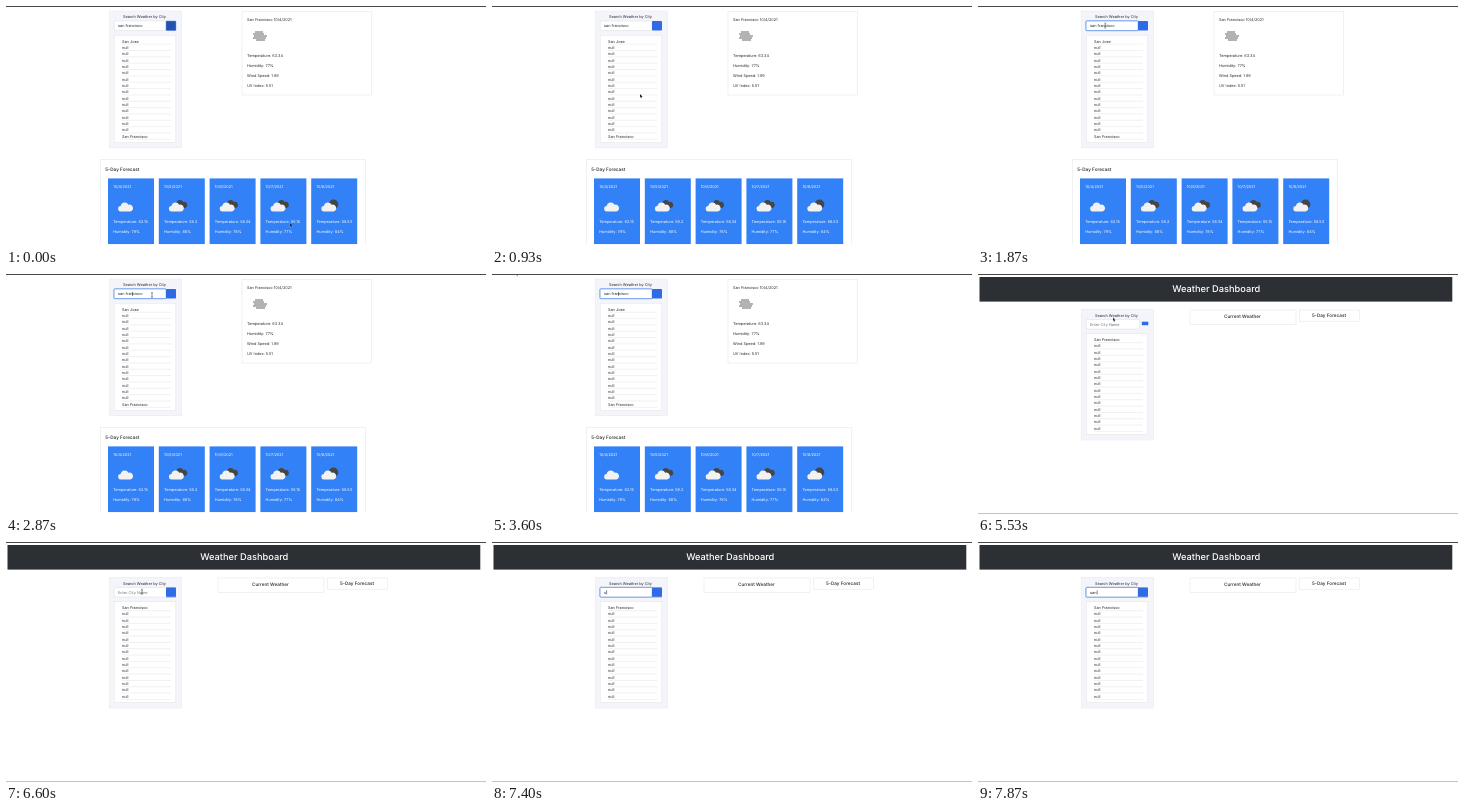
An HTML page for the animation above (8 s loop, 480 px wide and 240 px high).

```html
<!DOCTYPE html>
<html lang="en">
<head>
<meta charset="utf-8">
<title>Weather Dashboard</title>
<style>
  html, body { margin: 0; width: 100%; height: 100%; overflow: hidden; background: #fff; }
  svg { display: block; width: 480px; height: 240px; }
  text { font: 3.85px Inter, "Liberation Sans", sans-serif; fill: #212529; text-rendering: geometricPrecision; }
  .h1 { font-size: 9.25px; font-weight: 500; fill: #fff; text-anchor: middle; }
  .h5 { font-size: 4.65px; font-weight: 500; }
  .card text { fill: #fff; }
  .hint { fill: #6c757d; }
  .box { fill: #fff; stroke: #e2e3e5; stroke-width: .5; }
  .panel { fill: #f4f5fa; stroke: #e6e8ee; stroke-width: .5; }
  .field { fill: #fff; stroke: #ced4da; stroke-width: .4; }
  .ring { fill: none; stroke: #4f8bee; stroke-width: .8; }
  .rule { stroke: #d9dbde; stroke-width: .4; }
  .btn { fill: #2f6be4; }
  .caret { fill: #111; }
  .beam { stroke: #111; stroke-width: .5; fill: none; }

  .anim { animation: 8s step-end infinite; }
  #results { animation-name: results; }
  #home { animation-name: home; }
  #foot { animation-name: foot; }
  #pressed { animation-name: pressed; }
  #ringA { animation-name: ringA; }
  #ringB { animation-name: ringB; }
  #caretA { animation-name: caretA; }
  #caretB { animation-name: caretB; }
  #btnB { animation-name: btnB; }
  #hint { animation-name: hint; }
  #key0 { animation-name: key0; }
  #key1 { animation-name: key1; }
  #key2 { animation-name: key2; }
  #mouse { animation-name: mouse; }
  #arrow { animation-name: arrow; }
  #beam { animation-name: beam; }

  @keyframes results { 0% { opacity: 1 } 69.1%, 100% { opacity: 0 } }
  @keyframes home { 0% { opacity: 0 } 69.1%, 100% { opacity: 1 } }
  @keyframes foot { 0% { opacity: 0 } 52.45%, 100% { opacity: 1 } }
  @keyframes pressed { 0% { opacity: 1 } .83% { opacity: .45 } 1.6%, 100% { opacity: 0 } }
  @keyframes ringA {
    0% { opacity: 0 } 17.45% { opacity: .25 } 18.33% { opacity: .5 }
    19.17% { opacity: .8 } 20%, 100% { opacity: 1 }
  }
  @keyframes ringB {
    0% { opacity: 0 } 86.6% { opacity: .25 } 87.45% { opacity: .5 }
    88.3% { opacity: .8 } 89.1%, 100% { opacity: 1 }
  }
  @keyframes caretA {
    0% { opacity: 0 } 17.45% { opacity: 1 } 23.3% { opacity: 0 } 30% { opacity: 1 }
    36.6% { opacity: 0 } 42.5% { opacity: 1 } 48.3%, 100% { opacity: 0 }
  }
  @keyframes caretB {
    0% { opacity: 0; transform: none }
    86.6% { opacity: 1; transform: none }
    92.45% { opacity: 1; transform: translateX(2.1px) }
    95% { opacity: 1; transform: translateX(4.3px) }
    98.3%, 100% { opacity: 1; transform: translateX(6.7px) }
  }
  @keyframes btnB {
    0% { transform: translate(163.8px, 47.7px) scale(.65, .36) }
    69.95%, 100% { transform: translate(160px, 45.4px) }
  }
  @keyframes hint { 0% { opacity: 1 } 92.45%, 100% { opacity: 0 } }
  @keyframes key0 { 0% { visibility: hidden } 92.45%, 100% { visibility: visible } }
  @keyframes key1 { 0% { visibility: hidden } 95%, 100% { visibility: visible } }
  @keyframes key2 { 0% { visibility: hidden } 98.3%, 100% { visibility: visible } }
  @keyframes arrow {
    0% { opacity: 1 } 13.3% { opacity: 0 } 40.8% { opacity: 1 } 77.5%, 100% { opacity: 0 }
  }
  @keyframes beam {
    0% { opacity: 0 } 13.3% { opacity: 1 } 40.8% { opacity: 0 } 77.5%, 100% { opacity: 1 }
  }
  @keyframes mouse {
    0% { transform: translate(284px, 217px) }
    1.6% { transform: translate(283px, 216px) }
    3.33% { transform: translate(266px, 205px) }
    4.17% { transform: translate(230px, 176px) }
    5% { transform: translate(190px, 145px) }
    6.6% { transform: translate(160px, 123px) }
    10% { transform: translate(156px, 114px) }
    10.8% { transform: translate(148px, 88px) }
    11.7% { transform: translate(140px, 56px) }
    12.5% { transform: translate(130px, 30px) }
    13.3% { transform: translate(122px, 20px) }
    14.1% { transform: translate(127.2px, 19.6px) }
    35% { transform: translate(134px, 20px) }
    35.8% { transform: translate(146px, 21px) }
    36.6% { transform: translate(157px, 22px) }
    40% { transform: translate(152px, 19px) }
    40.8% { transform: translate(138px, 12px) }
    41.7% { transform: translate(112px, 8px) }
    42.5% { transform: translate(84px, 5px) }
    43.3% { transform: translate(58px, 2px) }
    44.95% { transform: translate(24px, -2.5px) }
    46.6% { transform: translate(24px, -9px) }
    57.45% { transform: translate(118px, 37px) }
    58.3% { transform: translate(135px, 43.5px) }
    75.8% { transform: translate(136px, 44px) }
    76.7% { transform: translate(137.5px, 45px) }
    77.5% { transform: translate(139px, 47px) }
    78.3% { transform: translate(140px, 48.5px) }
    79.1% { transform: translate(138.5px, 50px) }
    80% { transform: translate(135px, 50.5px) }
    80.8% { transform: translate(132.5px, 50.5px) }
    81.7% { transform: translate(134.5px, 50px) }
    82.45% { transform: translate(136px, 49.8px) }
    92.45%, 100% { transform: translate(136px, -20px) }
  }
</style>
</head>
<body>
<svg id="stage" viewBox="0 0 480 240"></svg>
<script>
  // Text is placed by the vertical middle of its capitals.
  const text = (x, y, str, cls = '', drop = 1.4) =>
    `<text x="${x}" y="${y + drop}" class="${cls}">${str}</text>`;
  const rect = (x, y, w, h, cls, r = 0, id = '') =>
    `<rect x="${x}" y="${y}" width="${w}" height="${h}" rx="${r}" class="${cls}" id="${id}"/>`;
  const nulls = n => Array(n).fill('null');

  // Search panel; y is its top edge.
  function panel(y, cities, wide) {
    const step = 6.34, tall = cities.length * step;
    const rows = cities.map((city, i) => {
      const mid = y + 30.1 + i * step;
      return text(116, mid, city) +
        `<path class="rule" d="M116 ${mid + 3.1}H165"/>`;
    }).join('');
    return rect(103.2, y, 72.3, tall + 35.4, 'panel') +
      text(117, y + 5.6, 'Search Weather by City') +
      rect(108.2, y + 10, wide, 9.5, 'field', .8) +
      rect(108.2, y + 24.2, 61.6, tall + 5.6, 'box') + rows;
  }

  const puff = 'M-5.5 5a3 3 0 0 1-.3-6 4.6 4.6 0 0 1 8.6-1.6 3.9 3.9 0 0 1 2.2 7.6Z';
  function icon(x, y, kind) {
    const back = {
      plain: '',
      clouds: `<path d="${puff}" fill="#454545" transform="translate(3.6 -2) scale(.8)"/>`,
      moon: '<circle cx="3.8" cy="-1.6" r="4.8" fill="#454545"/>'
    }[kind];
    return `<g transform="translate(${x} ${y})">${back}
      <path d="${puff}" fill="#f2f2f2" transform="translate(-.6 1) scale(.9)"/></g>`;
  }

  const days = [
    [62.15, 79, 'plain'], [59.2, 88, 'clouds'], [58.34, 78, 'clouds'],
    [55.15, 77, 'clouds'], [58.53, 84, 'moon']
  ];
  const card = ([temp, wet, kind], i) => {
    const x = 102 + i * 50.8;
    return `<g class="card"><rect x="${x}" y="172.4" width="46" height="65.8" fill="#3381f6"/>` +
      text(x + 5.2, 181, `10/${i + 4}/2021`) + icon(x + 18.5, 200, kind) +
      text(x + 5.2, 216, `Temperature: ${temp}`) +
      text(x + 5.2, 226, `Humidity: ${wet}%`) + '</g>';
  };

  const mist = [[249, 257], [247, 258], [248, 261], [247, 260], [250, 259]]
    .map(([a, b], i) => `M${a} ${26 + i * 2}H${b}`).join('');
  const facts = ['Temperature: 63.34', 'Humidity: 77%', 'Wind Speed: 1.99', 'UV Index: 5.51'];

  const results = panel(5, ['San Jose', ...nulls(14), 'San Francisco'], 51.8) +
    rect(107.9, 14.8, 52.4, 9.9, 'ring anim', .8, 'ringA') +
    text(112, 20, 'san francisco') +
    rect(126.4, 17.9, .5, 4, 'caret anim', 0, 'caretA') +
    rect(160, 14.9, 10, 9.7, 'btn', .8) +
    '<rect id="pressed" class="anim" x="160" y="14.9" width="10" height="9.7" rx=".8" fill="#2450b0" stroke="#7d9fdf" stroke-width=".5"/>' +
    rect(236, 5.5, 129.5, 83.5, 'box') +
    text(241, 14, 'San Francisco 10/4/2021') +
    `<path d="${mist}" stroke="#555" stroke-width=".9"/>` +
    facts.map((f, i) => text(241, 49.5 + i * 10, f)).join('') +
    rect(94.5, 153.5, 265, 95, 'box') +
    text(99.3, 163, '5-Day Forecast', 'h5', 1.7) +
    days.map(card).join('') +
    '<rect y="238.3" width="480" height="2" fill="#fff"/>';

  const keys = [...'san'].map((c, i) => `<tspan id="key${i}" class="anim">${c}</tspan>`).join('');
  const home = '<rect x="1.5" y="3" width="472.8" height="24.6" fill="#2c3034"/>' +
    text(238.3, 14.8, 'Weather Dashboard', 'h1', 3.3) +
    panel(35.5, ['San Francisco', ...nulls(14)], 53.5) +
    rect(107.9, 45.3, 52.4, 9.9, 'ring anim', .8, 'ringB') +
    `<g id="hint" class="anim">${text(112, 50.4, 'Enter City Name', 'hint')}</g>` +
    text(112, 50.4, keys) +
    rect(112, 48.3, .5, 4, 'caret anim', 0, 'caretB') +
    rect(0, 0, 10, 9.7, 'btn anim', .8, 'btnB') +
    rect(212, 36, 106, 14.3, 'box') +
    text(246, 42.6, 'Current Weather', 'h5', 1.7) +
    rect(321.5, 36, 60, 11.2, 'box') +
    text(334, 41.5, '5-Day Forecast', 'h5', 1.7);

  document.getElementById('stage').innerHTML = `
    <rect width="480" height="240" fill="#fff"/>
    <g id="results" class="anim">${results}</g>
    <g id="home" class="anim">${home}</g>
    <rect width="480" height=".9" fill="#333"/>
    <rect id="foot" class="anim" y="239" width="480" height="1" fill="#c4c4c4"/>
    <g id="mouse" class="anim">
      <path id="arrow" class="anim" d="M0 0V3.7L.9 2.9 1.5 4.3 2.1 4 1.5 2.7H2.7Z" fill="#000" stroke="#fff" stroke-width=".2"/>
      <path id="beam" class="beam anim" d="M-.8-2.3H.8M0-2.3V2.3M-.8 2.3H.8"/>
    </g>`;
</script>
</body>
</html>
```
